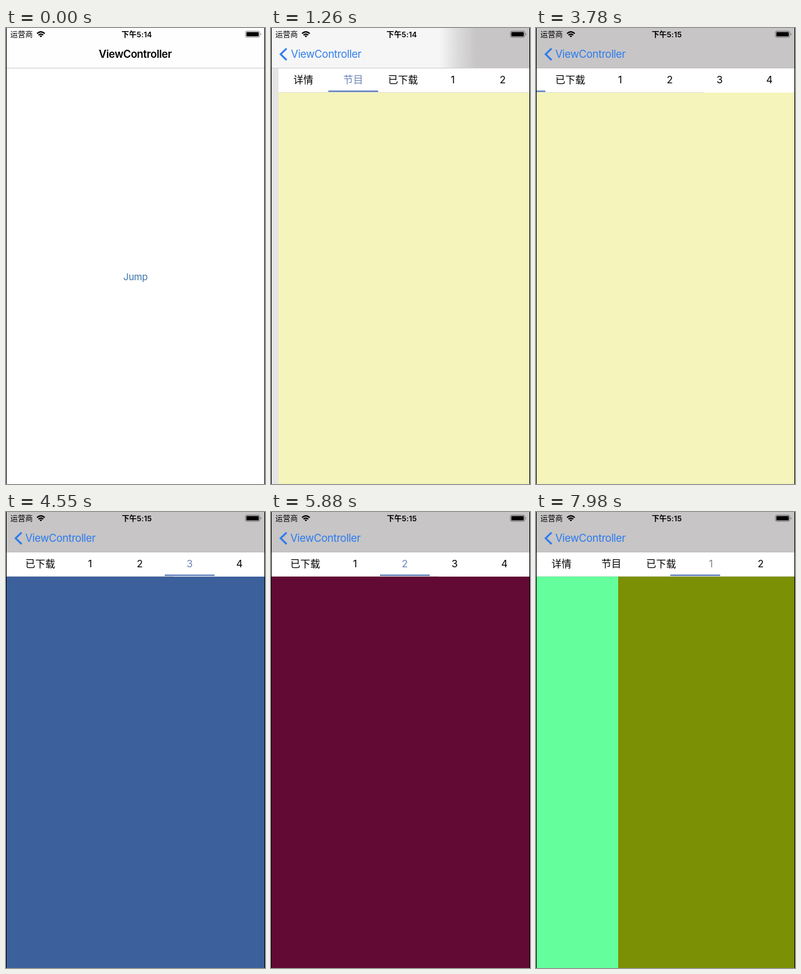
An HTML page for the animation above (8000 ms loop, 416x734 px).

```html
<!DOCTYPE html>
<html lang="zh-CN">
<head>
<meta charset="utf-8">
<style>
  html, body { margin: 0; width: 100%; height: 100%; overflow: hidden; background: #000; }
  svg { display: block; width: 416px; height: 734px; font-family: Inter, "Noto Sans CJK SC", "Noto Sans CJK", sans-serif; }
  .nav { font-size: 17px; letter-spacing: -0.4px; }
  .status { font-size: 12px; }
  .tabs text { font-size: 16px; text-anchor: middle; }
</style>
</head>
<body>
<svg viewBox="0 0 416 734">
  <defs>
    <clipPath id="screen"><rect x="1" width="414" height="734"/></clipPath>
    <linearGradient id="barFill" gradientUnits="userSpaceOnUse" x1="-30" x2="30">
      <stop offset="0" stop-color="#f6f6f6"/>
      <stop offset=".5" stop-color="#dcdbdc"/>
      <stop offset="1" stop-color="#c7c5c6"/>
    </linearGradient>
  </defs>
  <rect width="416" height="734"/>
  <g clip-path="url(#screen)">
    <rect width="416" height="734" fill="#fff"/>
    <text id="jump" x="208" y="405.5" font-size="15" letter-spacing="-.2" text-anchor="middle" fill="#3b74a9">Jump</text>
    <rect id="dim" width="416" height="734"/>
    <g id="detail">
      <g clip-path="url(#screen)">
        <g id="pages"></g>
        <rect x="1" y="64" width="414" height="40" fill="#fff"/>
        <g id="tabs" class="tabs">
          <rect x="1" y="103" width="414" height="1" fill="#e2e2e2"/>
          <rect id="marker" y="100.6" width="80" height="2.4" fill="#6583bb"/>
        </g>
      </g>
    </g>
    <rect id="bar" width="416" height="64.5"/>
    <rect id="hairline" y="64" width="416" height="1"/>
    <text id="title" class="nav" x="149" y="48" font-weight="600">ViewController</text>
    <g id="back" fill="#2c7bee">
      <path d="M25 33 L15.5 42.3 L25 51.6" fill="none" stroke="#2c7bee" stroke-width="3"/>
      <text id="backLabel" class="nav" x="31" y="48">ViewController</text>
    </g>
    <g class="status">
      <text x="7" y="14.7">运营商</text>
      <text id="clock" x="210" y="14.7" font-weight="600" letter-spacing=".1" text-anchor="middle"></text>
      <g fill="none" stroke="#000" stroke-width="2.1">
        <path d="M49.8 9.1 Q56 3.2 62.2 9.1"/>
        <path d="M52.2 11.6 Q56 8 59.8 11.6"/>
      </g>
      <path d="M53.9 12.9 Q56 11.2 58.1 12.9 L56 15Z"/>
      <rect x="384.5" y="5" width="23" height="10" rx="2.5" fill="none" stroke="#000" stroke-opacity=".45"/>
      <rect x="386" y="6.5" width="20" height="7" rx="1.2"/>
      <path d="M409 8 Q411 10 409 12Z" fill-opacity=".5"/>
    </g>
  </g>
</svg>
<script>
const LOOP = 8000, STEP = 70, WIDTH = 414, TAB = 80, SLIDE = 190;
const labels = ["详情", "节目", "已下载", "1", "2", "3", "4"];
const colors = ["#b9a8c8", "#f5f4ba", "#64ff9c", "#7b9004", "#620a33", "#3c609b", "#8c7f78"];
// Start time and tab index of each tap.
const taps = [[3810, 5], [4720, 6], [5280, 4], [5910, 3], [6470, 2]];

const $ = id => document.getElementById(id);
const set = (el, attrs) => { for (const k in attrs) el.setAttribute(k, attrs[k]); };
const add = (parent, tag, attrs) => {
  const el = document.createElementNS("http://www.w3.org/2000/svg", tag);
  set(el, attrs);
  return parent.appendChild(el);
};
const shift = (el, x) => el.setAttribute("transform", `translate(${x} 0)`);
const progress = (t, start, end) => Math.min(1, Math.max(0, (t - start) / (end - start)));
const ease = p => p * p * (3 - 2 * p);
const lerp = (a, b, p) => a + (b - a) * p;

colors.forEach((fill, i) =>
  add($("pages"), "rect", { x: 1 + i * WIDTH, y: 64, width: WIDTH, height: 670, fill }));
const tabTexts = labels.map((label, i) => {
  const el = add($("tabs"), "text", { x: 1 + TAB * (i + .5), y: 89 });
  el.textContent = label;
  return el;
});

// Fraction of the push transition still to travel, as a critically damped spring.
function pushRemaining(t) {
  if (t < 960) return 1;
  if (t > 1470) return 0;
  const wt = (t - 960) * .0183;
  return (1 + wt) * Math.exp(-wt);
}

function drawNav(t, rest) {
  const pushed = t >= 960;
  set($("bar"), { fill: pushed ? (t < 1470 ? "url(#barFill)" : "#c7c5c6") : "#fefefe" });
  shift($("title"), 0);
  $("barFill").setAttribute("gradientTransform", `translate(${300 - (t - 1260) * 2} 0)`);
  set($("hairline"), { fill: t < 1470 ? "#cbcbcd" : "#bdbbbc" });
  const slide = 118 * Math.pow(rest, 1.3);
  shift($("title"), slide - 118);
  set($("title"), { opacity: pushed ? Math.max(0, rest * 1.4 - .4) : 1 });
  shift($("backLabel"), slide);
  set($("back"), { opacity: pushed ? 1 - rest : 0 });
  $("clock").textContent = t < 1750 ? "下午5:14" : "下午5:15";
}

function drawTabs(t) {
  // A tap switches the page at once while the marker slides after it.
  let page = 1, marker = 1;
  for (const [start, target] of taps) {
    if (t < start) break;
    marker = lerp(page, target, ease(progress(t, start, start + SLIDE)));
    page = target;
  }
  // The closing swipe drags page and marker together.
  const swipe = t < 7770 ? 0 : lerp(.07, .684, progress(t, 7770, 7980));
  page += swipe;
  marker += swipe;

  const scrolled = ease(progress(t, 1560, 2480));
  const returned = 1 - Math.pow(1 - progress(t, 6880, 7070), 2);
  shift($("tabs"), -146 * (scrolled - returned));
  shift($("pages"), -Math.round(page * WIDTH));
  set($("marker"), { x: 1 + marker * TAB });
  tabTexts.forEach((el, i) => {
    const selected = i === Math.round(page);
    set(el, { fill: selected ? (swipe ? "#858589" : "#6c84b8") : "#000" });
  });
}

function render(time) {
  const t = Math.floor((time % LOOP) / STEP) * STEP;
  const rest = pushRemaining(t);
  shift($("jump"), -.3 * WIDTH * (1 - rest));
  set($("jump"), { opacity: t >= 840 ? .3 : 1 });
  set($("dim"), { opacity: .105 * (1 - rest) });
  shift($("detail"), rest * (WIDTH + 1));
  drawNav(t, rest);
  drawTabs(t);
}

const begin = performance.now();
function tick() {
  render(performance.now() - begin);
  requestAnimationFrame(tick);
}
tick();
</script>
</body>
</html>
```
